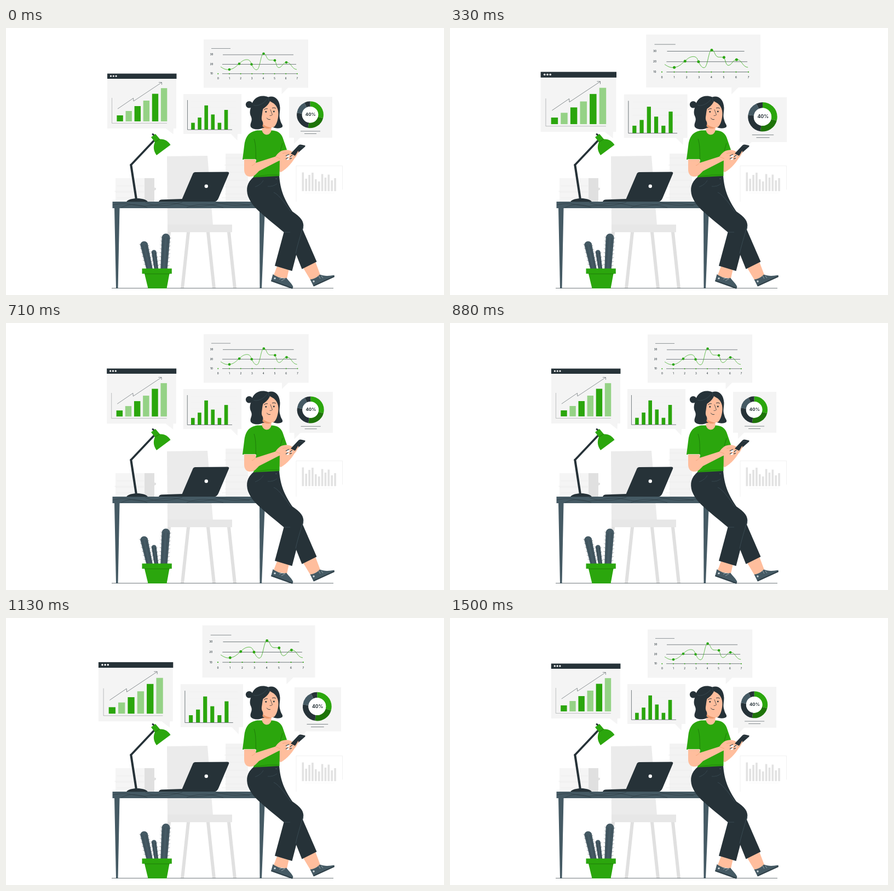
An HTML page with a canvas for the animation above (1540 ms loop, 800 by 489 pixels).

```html
<!DOCTYPE html>
<html lang="en">
<head>
<meta charset="utf-8">
<title>Analyst at her desk</title>
<style>
html, body { margin: 0; width: 100%; height: 100%; overflow: hidden; background: #fff; }
canvas { display: block; width: 800px; height: 489px; }
</style>
</head>
<body>
<canvas id="stage" width="800" height="489"></canvas>
<script>
const ctx = document.getElementById('stage').getContext('2d');
const DARK = '#263238', SLATE = '#455a64', GREEN = '#2ba60d', LIME = '#95d286';
const PANEL = '#f4f4f4', SKIN = '#ffbe9d', BLUSH = '#eb996e';
const LOOP = 1540, FRAMES = 37;
const PIVOT = { x: 391, y: 117 }, GROWTH = 0.104;

function fill(d, color) {
  ctx.fillStyle = color;
  ctx.fill(new Path2D(d));
}

function line(d, color, width = 0.6) {
  ctx.strokeStyle = color;
  ctx.lineWidth = width;
  ctx.stroke(new Path2D(d));
}

function box(x1, y1, x2, y2, color) {
  ctx.fillStyle = color;
  ctx.fillRect(x1, y1, x2 - x1, y2 - y1);
}

function dot(x, y, r, color) {
  ctx.fillStyle = color;
  ctx.beginPath();
  ctx.arc(x, y, r, 0, Math.PI * 2);
  ctx.fill();
}

function label(text, x, y, size, weight = 500) {
  ctx.fillStyle = DARK;
  ctx.font = `${weight} ${size}px Inter, sans-serif`;
  ctx.textAlign = 'center';
  ctx.textBaseline = 'middle';
  ctx.fillText(text, x, y);
}

// Bars share a baseline and a constant pitch
function bars(x, step, width, base, tops, colors) {
  tops.forEach((top, i) =>
    box(x + i * step, top, x + i * step + width, base, colors[i % colors.length]));
}

function growthWindow() {
  fill('M185 93H311V184H306L305.5 194.5L292 184H185Z', PANEL);
  box(185, 83.5, 311.5, 93, DARK);
  for (const x of [191.5, 196.3, 201.1]) dot(x, 88, 1.6, '#fff');
  bars(202.4, 16.1, 11.4, 171, [160, 152, 143, 133, 120.5, 110.2], [GREEN, LIME]);
  line('M193.5 128V174.4H294', '#85898b', 0.5);
  line('M204 148L232.5 128.5L233 134L284 100M279 99.5H284.5V104', DARK, 0.5);
}

function barPanel() {
  fill('M324 121H430V194H423L422.5 206L411 194H324Z', PANEL);
  for (let y = 134; y < 180; y += 11) line(`M338 ${y}H421`, '#eeeeee', 0.5);
  bars(338.2, 12.1, 6.6, 186, [173.6, 164, 141.8, 158.4, 173.6, 150], [GREEN]);
  line('M331.5 132V186.2H413', DARK, 0.6);
}

function curvePanel() {
  fill('M361 21H552V109.5H515L503.5 121V109.5H361Z', PANEL);
  line('M375 37.5H410', DARK, 0.5);
  line('M396 49H525M395 66.5H530M395 83.7H531', DARK, 0.6);
  label('30', 375.5, 49, 4.4);
  label('20', 375.5, 66.5, 4.4);
  label('10', 375.5, 84, 4.4);
  for (let i = 0; i < 8; i++) {
    const x = 387.3 + i * 20.65;
    label(i, x, 93, 4.4);
    dot(x, 83.7, 1, GREEN);
  }
  line('M392 71C398 75 402 77 408 76C417 75 421 69 426 65.5C431 60 436 57.5 441 58' +
    'C446 58.5 447 63 448.5 66.5C452 74 455 77 458 76.5C464 76 465 47 470.5 47' +
    'C476 47 475 58 482 58.8C487 59 490 57.5 493 64C494.5 70 496 73 499 72.5' +
    'C504 72 506 63 512 63C521 62 521 75 531 76', GREEN, 0.7);
  [[408, 76], [426, 65.5], [448.5, 66.5], [470.5, 47], [491, 59.3], [512, 63]]
    .forEach(([x, y]) => dot(x, y, 2.3, GREEN));
}

function donutPanel() {
  fill('M517 126H596V201H537L526 212V201H517Z', PANEL);
  const slices = [[-90, 15, GREEN], [15, 99, '#1e7409'], [99, 188, DARK], [188, 245, SLATE], [245, 270, DARK]];
  for (const [from, to, color] of slices) {
    ctx.strokeStyle = color;
    ctx.lineWidth = 9.7;
    ctx.beginPath();
    ctx.arc(555.5, 158.8, 19.6, from * Math.PI / 180, to * Math.PI / 180);
    ctx.stroke();
  }
  dot(555.5, 158.8, 14.8, '#fff');
  label('40%', 556.2, 158.8, 8, 700);
  line('M538 189H574M545 193.5H567', DARK, 0.55);
}

function background() {
  box(200, 275, 253, 318, '#f5f5f5');
  box(253, 275, 271, 318, '#e0e0e0');
  fill('M265 291L274 293V296L266 300Z', '#e0e0e0');
  line('M202 289H252M198 299H252M200 301H252M202 311H252', '#e8e8e8', 0.7);

  box(401, 230, 442, 318, '#f3f3f3');
  line('M401 238H442M399 251H442M403 264H442M396 279H442M398 291H442M400 304H442M394 311H442', '#e8e8e8', 0.7);

  line('M530 318V252.5H614.5V296', '#e8e8e8', 0.6);
  bars(540.5, 5.88, 3.6, 298.7,
    [264.5, 276, 269, 265, 277, 281, 267.5, 274, 268.5, 279, 275], ['#e2e2e2']);
  line('M545 302H600', '#f0f0f0', 0.5);

  fill('M294 235L368 234L378 361H295Z', '#ebebeb');
  fill('M295 374H301L290 477H284Z', '#e0e0e0');
  fill('M330 374H336L325 477H319Z', '#e0e0e0');
  fill('M366 374H372L383 477H377Z', '#e0e0e0');
  fill('M404 374H410L421 477H415Z', '#e0e0e0');
  box(295, 360, 413, 374, '#e7e7e7');
}

function desk() {
  line('M193 476.5H598', DARK, 0.65);
  fill('M198 330H207.5L204.5 477H201Z', SLATE);
  fill('M463 330H473L467 477H463.5Z', SLATE);
  box(194.5, 318, 476, 330, SLATE);
  line('M195 324C225 317 232 328 257 326S292 318 314 322S344 329 368 325S407 318 445 325' +
    'M210 329C226 321 241 322 258 329M254 319C276 330 299 325 322 319M330 329C350 321 370 321 397 329M383 319C410 326 429 327 459 321', DARK, 0.5);

  fill('M341.5 266.5Q342.5 264 345.5 264L404 263.5Q408.5 263.5 407 267L388 312Q385 318 381 318H319.5Z', DARK);
  fill('M279 318Q280 314.5 285 314.2L323 313V318Z', DARK);
  dot(365.8, 289.8, 3.2, '#fff');
}

function lamp() {
  ctx.lineCap = 'round';
  line('M238 314L228.3 250.7', DARK, 4.1);
  line('M228.3 250.7L270 206.5', DARK, 3.7);
  line('M268 194.5L272 198', DARK, 3);
  ctx.lineCap = 'butt';
  fill('M220 318.3C225 310 254 310 259 318.3Z', DARK);
  fill('M265 200L273 194L281 203.5C290 203 297 208 300.5 214L275 233C270 226 268 218 272 209Z', GREEN);
  line('M271.5 209L281 203.5', '#176008', 0.6);
}

// Rounded stem that narrows towards the pot, with short thorns on both edges
function cactus(x1, top, x2, width, thorns) {
  const base = 441, half = width / 2, foot = half * 0.84, y1 = top + half;
  fill(`M${x1 - half} ${y1}A${half} ${half} 0 0 1 ${x1 + half} ${y1}L${x2 + foot} ${base}H${x2 - foot}Z`, SLATE);
  for (const side of [-0.22, 0.22]) {
    line(`M${x1 + side * width} ${y1}L${x2 + side * width} ${base}`, DARK, 0.4);
  }
  for (let i = 0; i < thorns; i++) {
    const k = i / thorns;
    const x = x1 + (x2 - x1) * k, y = y1 + (base - y1) * k;
    line(`M${x - half + 2} ${y}l-4 -1.5M${x + half - 2} ${y + 2}l4 -1.5`, DARK, 0.4);
  }
}

function plant() {
  cactus(252.3, 390.5, 262, 14, 6);
  cactus(270.3, 406.5, 274.5, 9, 4);
  cactus(292, 376.5, 288.5, 15, 8);
  fill('M253 450H298.5L293.5 477H259.5Z', GREEN);
  box(248.5, 440.5, 302.8, 450, GREEN);
  line('M253 450.3H299', '#176008', 0.6);
}

function legs() {
  fill('M496 434L517 441L513 459L488 455Z', SKIN);
  fill('M542 438L565 428L574 452L557 463Z', SKIN);

  fill('M487.5 451C496 457 506 460 512 457.5C517 464 522 468 524.5 474L523 478L484 464Z', SLATE);
  line('M484.5 462.5L523.5 476.5', DARK, 1.1);
  line('M499 460L506 457M503 463L510 459', '#cfd8dc', 0.6);
  dot(491, 458.5, 1.7, '#cfd8dc');
  fill('M555.5 460.5C561 460 568 457 573 451.5C582 455 591 454 599.5 452.5L600 456L562 473.5Z', SLATE);
  line('M561.5 472L599.5 455', DARK, 1.1);
  line('M574 459L571 454M579 458L576 454', '#cfd8dc', 0.6);
  dot(562, 464, 1.7, '#cfd8dc');

  fill('M510 362L541.5 368L567.5 428L540.5 441.5L524 400Z', DARK);
  fill('M453 272L499 270C501 298 509 315 523 336C538 346 545 354 543 366L522.5 445L491 435.5L507.5 374' +
    'C492 361 478 350 466 339C454 329 446 319 442 308C438 294 440 283 453 272Z', DARK);
  line('M489 301C499 305 513 326 520 336M543 360C541 372 534 390 529 413M519 374Q512 374 507.5 374', SLATE, 0.6);
  line('M455 291Q466 287 470 279M478 290Q488 291 495 285', SLATE, 0.5);
  dot(493.5, 276, 1, SLATE);
}

function torso() {
  fill('M500 238L516 229L530 232C525 245 514 257 502 264L497 262Z', SKIN);
  fill('M459 187.5C444 190 438 198 435.5 213L432 241H457L452 273.5L499.5 271L500 238L513 223' +
    'L505.5 201C502 192 496 188 484 187.5Z', GREEN);
  line('M453 203C457 214 456 229 456.5 241M501 225L505 211', '#176008', 0.6);
  line('M456 272Q478 268 499 269', '#176008', 0.5);

  fill('M468.5 170L467.5 187.5C470 198 482 198 484.5 188L485 177Z', SKIN);

  fill('M435 240.5H456V247L492 235.5C497 229 501 225 507 224C514 222 521 224 526 229' +
    'L532 222Q535 221 534 226L529 236Q525 243 518 244L506 240L497 244' +
    'L462 262C456 268 454 271.5 448 272C440 273 435 268 435 259Z', SKIN);
  fill('M520 230L534.5 214.5Q536 213.3 538.5 213.5L545.5 215Q547.5 215.5 546 217.5L533 229L528 234Z', DARK);
  line('M534 216L543 218', SLATE, 0.6);
  fill('M527 236L533 226Q535 224 534 228L529 237Z', SKIN);

  line('M455.5 247Q453 251 449 252M493 236Q497 238 501 239M505 230Q512 227 519 231', BLUSH, 0.6);
  fill('M512 233L517 231.5L518 235L513.5 237ZM511 239L515 237.5L518 240L514 242ZM520 235L523 233.5L522 238Z', '#fff');
  line('M511 234L517 231.5M511 240L515 237.5M519 236L523 233M518 240L522 238', DARK, 1.1);
  line('M434 240.5H456', '#fff', 0.6);
}

function head() {
  dot(444.2, 140.2, 6.3, DARK);
  fill('M448.5 142C451 128 464 121 479 126.5C490 123 499.5 130 500.5 146C500.5 156 498 160 501 169' +
    'C502 175 507 178 504.5 181.5C499 185 492 184 486 181L469 183C459 188 447 185 446.5 179' +
    'C446 173 451 170 447.5 162C444 155 446 149 448.5 142Z', DARK);
  fill('M482 134C479 141 474 145 469.5 148C468 153 468 158 467 163C466.5 167 467.5 170 469 172' +
    'L470 179C477 182.5 484 183.5 489 181.5C494 178 497 168 497.5 158C498 148 493 140 487 137Z', SKIN);
  fill('M469 176C474 180 479 182 485 182.5C479 186 472 184 468.5 180Z', BLUSH);
  line('M452 141C458 144 470 140 477 130M480 127C479 132 480 134 482 136', SLATE, 0.5);

  ctx.lineCap = 'round';
  line('M471.5 149.5Q474 147 477.5 147.7M486.5 146.5Q490 145 492.5 147', DARK, 1);
  line('M483 149.5L486.5 159Q485 161 482 160.5', DARK, 0.7);
  line('M476.5 165Q478.5 168.5 482.5 167.5', DARK, 0.9);
  ctx.lineCap = 'butt';
  dot(474.8, 153.5, 1.4, DARK);
  dot(489.3, 153, 1.4, DARK);
}

function pulse(frame, start, length, height) {
  const k = (frame - start) / length;
  return k > 0 && k < 1 ? height * (1 - Math.cos(k * Math.PI * 2)) / 2 : 0;
}

function draw(time) {
  const frame = Math.floor((time % LOOP + 4) / (LOOP / FRAMES)) % FRAMES;
  const scale = 1 + GROWTH * (pulse(frame, 1.28, 16.8, 1) + pulse(frame, 20.6, 16, 0.83));

  box(0, 0, 800, 489, '#fff');
  background();

  ctx.save();
  ctx.translate(PIVOT.x, PIVOT.y);
  ctx.scale(scale, scale);
  ctx.translate(-PIVOT.x, -PIVOT.y);
  growthWindow();
  barPanel();
  curvePanel();
  donutPanel();
  ctx.restore();

  desk();
  lamp();
  plant();
  legs();
  torso();
  head();
}

let origin;
function tick(now) {
  origin ??= now;
  draw(now - origin);
  requestAnimationFrame(tick);
}
draw(0);
requestAnimationFrame(tick);
</script>
</body>
</html>
```
